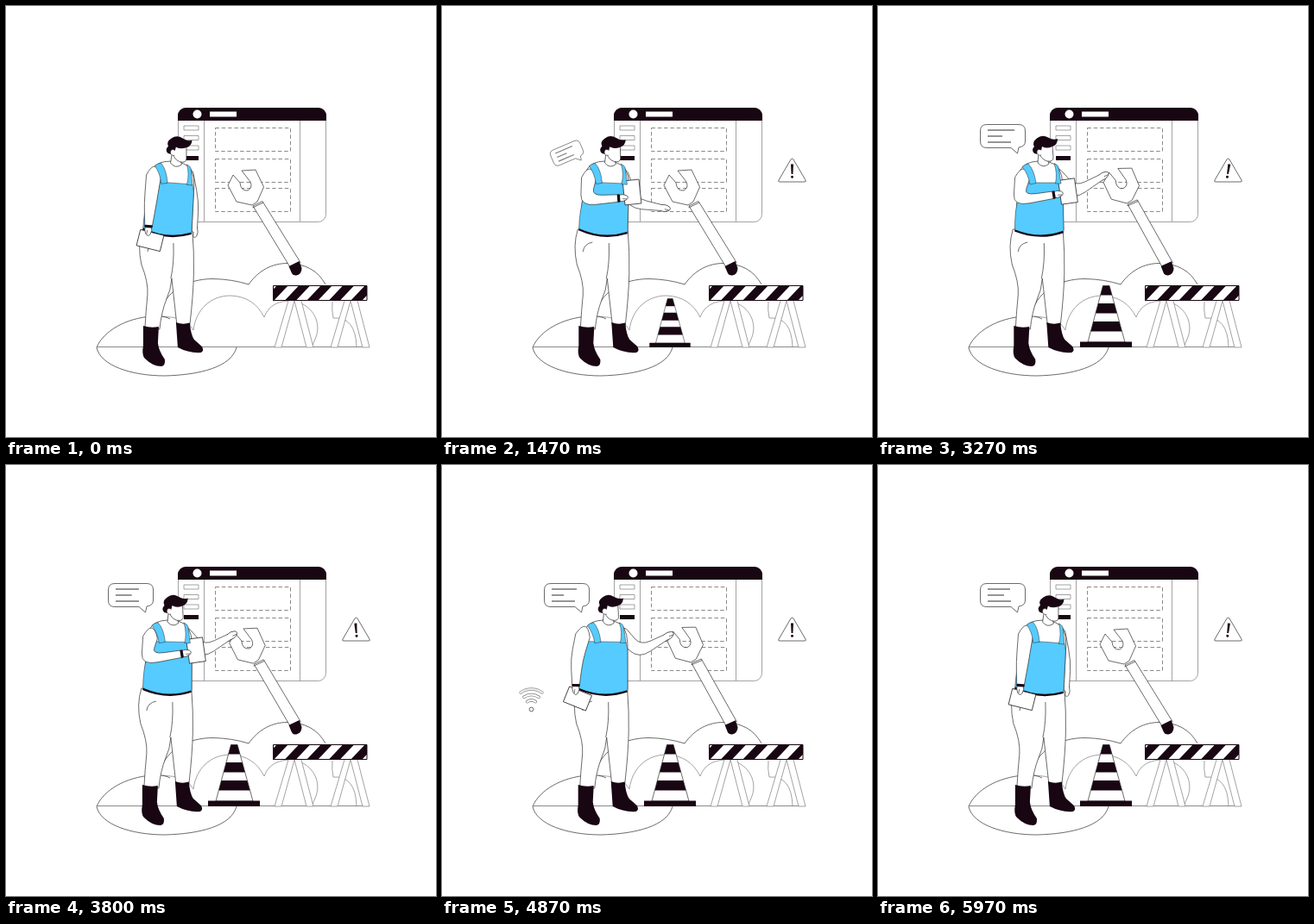
Animation of 498 by 500 pixels, one loop 6010 ms. Source, as an HTML page with a canvas:

```html
<!DOCTYPE html>
<html lang="en">
<head>
<meta charset="utf-8">
<title>Under construction</title>
<style>
  html, body { margin: 0; width: 100%; height: 100%; overflow: hidden; background: #fff; }
  canvas { display: block; width: 498px; height: 500px; }
</style>
</head>
<body>
<canvas id="stage"></canvas>
<script>
const LOOP = 6010, INK = '#180612', LINE = '#2b2b2b', SOFT = '#7c7c7c', BLUE = '#55cbff';
const canvas = document.getElementById('stage');
const ctx = canvas.getContext('2d');
const dpr = window.devicePixelRatio || 1;
canvas.width = 498 * dpr;
canvas.height = 500 * dpr;

// ---- timing helpers ----
const clamp = (v) => Math.min(1, Math.max(0, v));
const mix = (a, b, p) => a + (b - a) * p;
const smooth = (p) => p * p * (3 - 2 * p);
const easeOut = (p) => 1 - (1 - p) * (1 - p);
const span = (t, from, to) => clamp((t - from) / (to - from));

// Eased value at t from [time, number or pose] keys.
function track(keys, t) {
  let i = 1;
  while (i < keys.length - 1 && keys[i][0] < t) i++;
  const [t0, a] = keys[i - 1], [t1, b] = keys[i];
  const p = smooth(span(t, t0, t1));
  return Array.isArray(a) ? a.map((v, k) => mix(v, b[k], p)) : mix(a, b, p);
}

// ---- drawing helpers ----
function draw(path, fill, stroke, width = 0.7) {
  const p = typeof path === 'string' ? new Path2D(path) : path;
  if (fill) { ctx.fillStyle = fill; ctx.fill(p); }
  if (stroke) { ctx.strokeStyle = stroke; ctx.lineWidth = width; ctx.stroke(p); }
}

function box(x, y, w, h, fill, stroke, width, r = 0) {
  const p = new Path2D();
  p.roundRect(x, y, w, h, r);
  draw(p, fill, stroke, width);
}

function disc(x, y, r, fill, stroke) {
  const p = new Path2D();
  p.arc(x, y, r, 0, 7);
  draw(p, fill, stroke);
}

function around(x, y, degrees, scale, paint) {
  ctx.save();
  ctx.translate(x, y);
  ctx.rotate(degrees * Math.PI / 180);
  ctx.scale(scale, scale);
  ctx.translate(-x, -y);
  paint();
  ctx.restore();
}

// ---- scenery ----
function browser() {
  box(199.5, 118.5, 171, 132, '#fff', SOFT, 0.7, 9);
  box(199, 118, 172, 15, INK, null, 0, [9, 9, 0, 0]);
  disc(221.5, 125.5, 5, '#fff');
  box(236, 122.5, 31, 6, '#fff');
  draw('M229.5 133V250M340.5 133V250', null, SOFT);
  for (let i = 0; i < 3; i++) {
    box(206, 139 + i * 11.5, 17, 5, '#fff', SOFT);
    ctx.setLineDash([4.5, 2.8]);
    box(242.5, [141.5, 177.5, 211.5][i], 87, 27, null, SOFT, 0.9);
    ctx.setLineDash([]);
  }
  box(206, 174, 17, 5, INK);
}

function clouds() {
  draw('M177 361C182 331 210 316.500 240 316.500Q262 317 281 323C293 306 309 298.500 326 298.500Q357 299 370 323', '#fff', LINE);
  draw('M181 360Q210 361 217 376C220 352 237 336 260 336Q287 337 299 361C304 347 316 342 330 342C353 344 366 365 359 384L354 396', null, SOFT);
  draw('M378 343Q377 353 379 362Q405 360 406 396', null, SOFT);
  draw('M105 396C113 377 139 362 169 360Q183 359 190 363M105 396C109 417 145 429 184 429C224 428 261 419 267 396', null, LINE);
  draw('M105 395.500H420', null, SOFT, 0.9);
}

function barrier() {
  for (const x of [0, 65]) {
    draw(`M${327 + x} 342L${311 + x} 396H${319 + x}L${334 + x} 342M${334 + x} 342L${348 + x} 396H${356 + x}L${342 + x} 342`, '#fff', SOFT);
  }
  ctx.save();
  ctx.beginPath();
  ctx.rect(309, 324.5, 109, 17.5);
  ctx.fillStyle = '#fff';
  ctx.fill();
  ctx.clip();
  for (let x = 297; x < 420; x += 25.5) draw(`M${x} 342h13l17 -18h-13z`, INK);
  ctx.restore();
  box(309.5, 324.5, 108.5, 17, null, INK, 1);
}

function wrench(t) {
  const angle = track([[0, 0], [2800, 0], [3270, 2.4], [3800, 1], [4370, 0], [4870, 2.4], [5350, 0], [LOOP, 0]], t);
  around(336, 305, angle, 1, () => {
    draw('M286 232L297 226.500L341 297.500L329 303Z', '#fff', LINE);
    draw('M273 191L289 190L298.500 210L291 227L285 231L267 227L257 208L263 196L271 205Q272 215 280 214Q286 211 283 204Z', '#fff', LINE);
    draw('M285.500 234L298 228', null, LINE);
    draw('M327.500 302L339.500 296L342.500 304Q342.500 311 336.500 312.500Q332 313 330.500 309Z', INK);
  });
}

function cone(t) {
  const p = span(t, 1200, 1700);
  if (!p) return;
  around(264, 396, 0, easeOut(p), () => {
    const body = new Path2D('M260.5 324.5H268L286 390H243Z');
    draw(body, '#fff');
    ctx.save();
    ctx.clip(body);
    for (const y of [324, 345, 366]) box(234, y, 60, 11.5, INK);
    ctx.restore();
    draw(body, null, LINE);
    box(234, 389.5, 60, 6.5, INK);
  });
}

function warning(t) {
  const p = span(t, 650, 1100);
  if (!p) return;
  const u = t % 2000, phase = u < 300 ? u + 2000 : u;
  const wobble = t > 1070 && phase > 1070 && phase < 2270
    ? -9 * Math.sin((phase - 1470) / 800 * 2 * Math.PI) : 0;
  around(405.5, 195, 0, easeOut(p), () => {
    draw('M404 178Q405.5 176 407 178L421 202Q422 204 420 204H391Q389 204 390 202Z', '#fff', LINE);
    around(405.5, 192, wobble, 1, () => {
      draw('M404 183.5H407L406.4 195H404.6Z', INK);
      disc(405.5, 198.3, 1.5, INK);
    });
  });
}

function bubble(t) {
  const p = span(t, 1240, 1740);
  if (!p) return;
  const s = easeOut(p), u = t % 2000;
  const long = track([[0, 26], [370, 24], [470, 24], [870, 29], [1270, 31], [2000, 26]], u);
  const short = track([[0, 19], [370, 24], [470, 24], [870, 14], [1270, 17], [2000, 19]], u);
  ctx.save();
  ctx.translate(0, 28 * (1 - s));
  around(161, 171, -80 * (1 - s), s, () => {
    draw('M126 137.5H163Q170.5 137.5 170.5 145V157Q170.5 163 163 164L161.5 171L154 164.5H126Q118.5 164.5 118.5 157V145Q118.5 137.5 126 137.5Z', '#fff', LINE);
    [long, short, 27].forEach((w, i) => draw(`M127 ${144 + i * 7}h${w}`, null, SOFT, 1.6));
  });
  ctx.restore();
}

function wifi(t) {
  const u = t % 2000;
  const show = (i) => Math.min(span(u, 60 + i * 65, 150 + i * 65), 1 - span(u, 1080 - i * 80, 1240 - i * 80));
  ctx.save();
  ctx.globalAlpha = show(0);
  disc(103.5, 283.5, 2.4, '#fff', LINE);
  for (let i = 1; i < 4; i++) {
    const arc = new Path2D();
    arc.arc(103.5, 281, 1.5 + i * 6.5, -Math.PI * 0.7, -Math.PI * 0.3);
    ctx.globalAlpha = show(i);
    ctx.lineCap = 'round';
    draw(arc, null, SOFT, 3.6);
    draw(arc, null, '#fff', 2.2);
  }
  ctx.restore();
}

// ---- worker ----
// Near arm: shoulder, elbow, wrist, tablet centre, tablet angle.
const near = {
  down: [171, 197, 167, 230, 165, 256, 167, 272, 104],
  lift: [170, 200, 167, 226, 205, 223, 220, 216, -6],
  hold: [168, 200, 164, 225, 205, 218, 220, 213, -8],
  read: [167, 200, 163, 226, 204, 219, 220, 215, -8],
  lower: [169, 198, 167, 226, 194, 243, 211, 249, 40],
  back: [163, 198, 156, 226, 155, 256, 157, 271, 112]
};
const nearKeys = [[0, near.down], [350, near.down], [1250, near.lift], [1470, near.lift], [2470, near.hold],
  [3270, near.read], [3900, near.read], [4370, near.lower], [4750, near.back], [4870, near.back],
  [5800, near.down], [LOOP, near.down]];

// Far arm: shoulder, elbow, wrist.
const far = {
  down: [209, 195, 217, 228, 218, 258],
  reach: [208, 196, 221, 229, 254, 234],
  point: [207, 196, 226, 222, 249, 193],
  grip: [206, 196, 228, 217, 258, 199],
  pull: [208, 196, 229, 217, 259, 200]
};
const farKeys = [[0, far.down], [700, far.down], [1470, far.reach], [2100, far.point], [2470, far.point],
  [3050, far.grip], [3270, far.grip], [4370, far.pull], [5000, far.pull], [5850, far.down], [LOOP, far.down]];

const leanKeys = [[0, 4], [500, 4], [1470, 2.5], [2470, 1], [3270, 0], [4370, 3], [4870, 1], [5970, 4], [LOOP, 4]];

// Tapered two-part limb; returns the direction of the lower part.
function arm([sx, sy, ex, ey, hx, hy], ws, we, wh) {
  const a1 = Math.atan2(ey - sy, ex - sx), a2 = Math.atan2(hy - ey, hx - ex);
  const am = Math.atan2(Math.sin(a1) + Math.sin(a2), Math.cos(a1) + Math.cos(a2));
  const miter = Math.min(1.3, 1 / Math.max(0.5, Math.cos(a2 - am)));
  const off = (x, y, a, w) => [x - Math.sin(a) * w, y + Math.cos(a) * w];
  const toward = (p, q) => [mix(p[0], q[0], 0.4), mix(p[1], q[1], 0.4)];
  const path = new Path2D();
  const side = (a, e, b) => {
    path.lineTo(...toward(e, a));
    path.quadraticCurveTo(...e, ...toward(e, b));
    path.lineTo(...b);
  };
  const [s1, s2] = [ws, -ws].map((w) => off(sx, sy, a1, w));
  const [e1, e2] = [we, -we].map((w) => off(ex, ey, am, w * miter));
  const [h1, h2] = [wh, -wh].map((w) => off(hx, hy, a2, w));
  path.moveTo(...s1);
  side(s1, e1, h1);
  path.lineTo(...h2);
  side(h2, e2, s2);
  path.quadraticCurveTo(sx - Math.cos(a1) * ws * 2.6, sy - Math.sin(a1) * ws * 2.6, ...s1);
  draw(path, '#fff', LINE);
  return a2;
}

function hand(x, y, angle) {
  ctx.save();
  ctx.translate(x, y);
  ctx.rotate(angle);
  draw('M-1 -3.5Q5 -5 9 -2.500Q12 0 8.500 2.500Q4 5 -1 3.5', '#fff', LINE);
  draw('M4 1L9 1.5', null, LINE, 0.6);
  ctx.restore();
}

function legs() {
  draw('M157 259Q151 278 156 300Q164 320 163 335Q161 355 160 374L177 375Q179 355 185 340Q190 330 191 316L197 370H212Q216 335 216.5 310Q217 285 215 261Z', '#fff', LINE);
  draw('M163 285Q164 276 174 274M193 275Q194 298 190 316', null, LINE);
  draw('M158 371Q167 374 176 372L175 391Q176 400 183 410Q184 417 179 418Q169 418 160 409Q156 405 158 394Z', INK);
  draw('M196 367Q204 370 212 367.5Q213 381 217 387L226 395Q229 400 225 402Q211 403 198 396Z', INK);
}

function head() {
  draw('M186 170L185 182Q191 189 198 183L196 178Z', '#fff', LINE);
  draw('M187 162L202 162L203 176Q203 181 196 180Q189 178 187 171Z', '#fff', LINE);
  draw('M181 171Q177 167 181 163Q178 158 184 153.500Q190 148.500 197 152.500Q203 156 208 154Q208 161 202 163Q195 166 190 163L189 168Q185 166 185 172Z', INK);
  draw('M189 167Q184 165 184 170Q185 174 189 173', '#fff', LINE, 0.6);
}

function tablet(x, y, angle) {
  around(x, y, angle, 1, () => box(x - 9.5, y - 14, 19, 28, '#fff', LINE, 0.8));
}

function worker(t) {
  const lean = track(leanKeys, t);
  const pose = track(nearKeys, t), farPose = track(farKeys, t);
  const tilt = (paint) => around(187, 262, lean, 1, paint);

  const farAngle = arm(farPose, 8, 6.3, 3.5);
  hand(farPose[4], farPose[5], farAngle);

  ctx.save();
  ctx.translate(lean * 0.4 - 0.7, 0);
  legs();
  ctx.restore();

  tilt(() => {
    draw('M185 180Q170 181 165 190L161 225L159 260H215L214 207Q213 184 198 181Z', '#fff', LINE);
    draw('M167 205H212L214 213L215 262Q187 272 158.500 260.500Q158 238 163 220Z', BLUE, LINE, 0.5);
    draw('M158.500 260.500Q187 272 214.500 262', null, INK, 2.4);
    head();
  });

  const [, , , , wx, wy, tx, ty, angle] = pose;
  tablet(tx, ty, angle);
  const wrist = arm(pose, 8.5, 7, 4.2);
  hand(wx, wy, wrist);
  ctx.save();
  ctx.translate(wx, wy);
  ctx.rotate(wrist);
  box(-2, -4.6, 3.2, 9.2, INK, null, 0, 1);
  ctx.restore();

  tilt(() => {
    draw('M167 186.500Q170 183.500 174 183Q181 190 183 205.500L176 207Q174 195 167 186.500Z', BLUE, LINE, 0.5);
    draw('M204 182.500Q208 184 209 187L212 206H205.500Q208 194 204 182.500Z', BLUE, LINE, 0.5);
  });
}

function frame() {
  const t = performance.now() % LOOP;
  ctx.setTransform(dpr, 0, 0, dpr, 0, 0);
  ctx.fillStyle = '#fff';
  ctx.fillRect(0, 0, 498, 500);
  ctx.lineJoin = 'round';
  clouds();
  browser();
  wrench(t);
  cone(t);
  barrier();
  warning(t);
  bubble(t);
  wifi(t);
  worker(t);
  requestAnimationFrame(frame);
}
frame();
</script>
</body>
</html>
```
